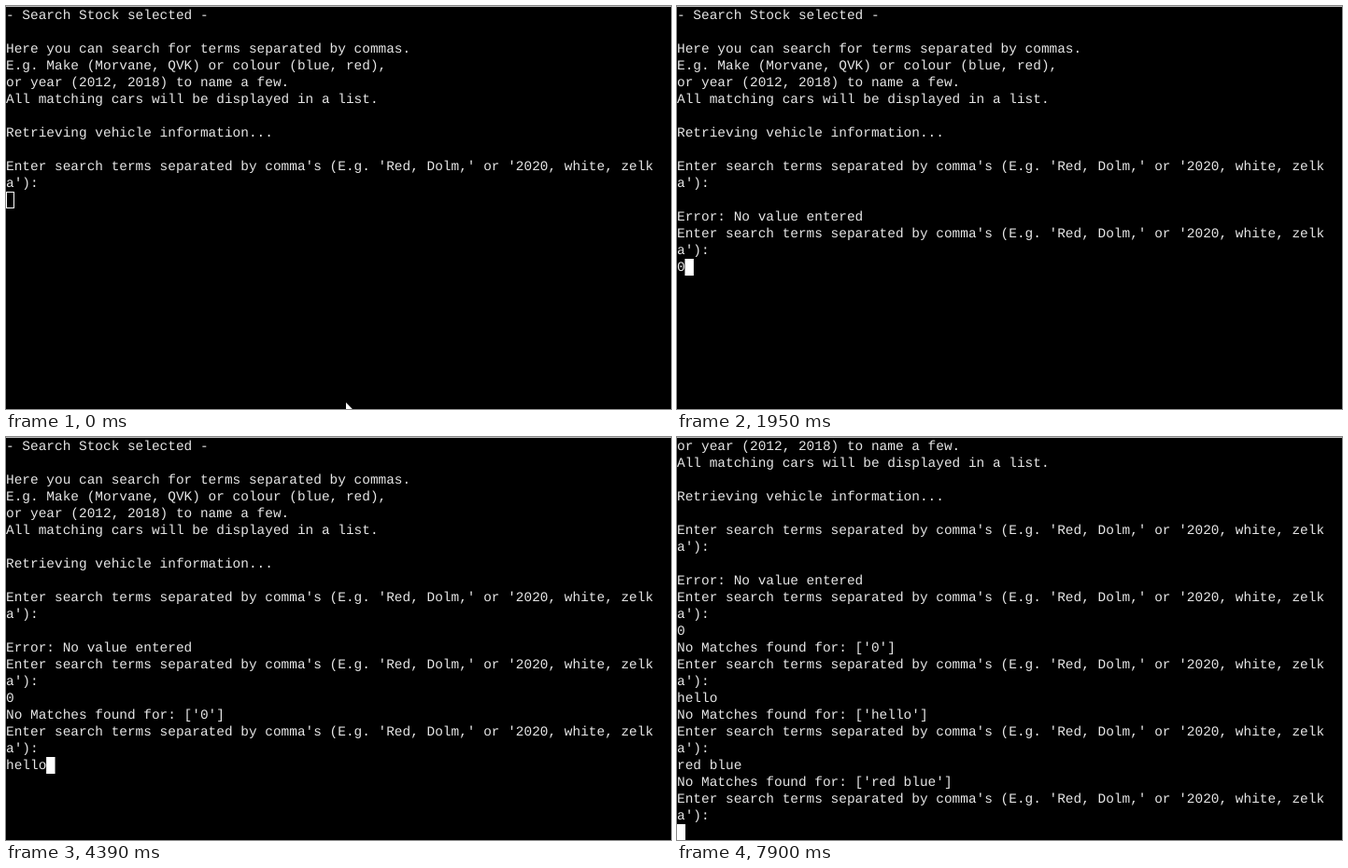
Animation, 712 px wide and 432 px high, one loop 7990 ms. Source, as an HTML page:

```html
<!DOCTYPE html>
<html lang="en">
<head>
<meta charset="utf-8">
<title>Search stock terminal</title>
<style>
html, body { margin: 0; width: 712px; height: 432px; overflow: hidden; background: #000; }
body { position: relative; border-top: 1px solid #bbb; box-sizing: border-box; }
pre, #caret, #pointer { position: absolute; left: 0; top: 0; margin: 0; }
pre {
  top: 1px;
  font: 14.44px/18px "Liberation Mono", monospace;
  text-rendering: geometricPrecision;
  color: #e6e6e6;
}
#caret { width: 8.67px; height: 18px; box-sizing: border-box; border: 1px solid #fff; }
#pointer { fill: #fff; }
</style>
</head>
<body>
<pre id="screen"></pre>
<div id="caret"></div>
<svg id="pointer" width="13" height="20"><path d="M0 0V15.5L3.7 12.2L6.2 17.8L8.6 16.7L6.2 11.2H11Z"/></svg>
<script>
const LOOP = 7990, ROWS = 24, COLS = 80, ROW_H = 18, COL_W = 8.666;
const FOCUS = 1000, POINTER_GONE = 1860;
const prompt = "Enter search terms separated by comma's (E.g. 'Red, Dolm,' or '2020, white, zelka'):\n";
const noMatch = term => `No Matches found for: ['${term}']\n` + prompt;
const intro = `- Search Stock selected -

Here you can search for terms separated by commas.
E.g. Make (Morvane, QVK) or colour (blue, red),
or year (2012, 2018) to name a few.
All matching cars will be displayed in a list.

Retrieving vehicle information...

` + prompt;

// [time, text appended to the terminal]
const output = [
  [0, intro],
  [1280, "\n"], [1390, "Error: No value entered\n" + prompt],
  [1860, "0"], [2350, "\n"], [2450, noMatch("0")],
  [3610, "h"], [3910, "e"], [4050, "l"], [4190, "l"], [4390, "o"],
  [4570, "\n"], [4680, noMatch("hello")],
  [5950, "r"], [6140, "e"], [6430, "d"], [6720, " "], [6900, "b"], [7090, "l"],
  [7350, "u"], [7390, "e"],
  [7530, "\n"], [7640, noMatch("red blue")]
];

const el = id => document.getElementById(id);
const screenEl = el("screen"), caret = el("caret"), pointer = el("pointer");
const wrap = line => line.match(new RegExp(`.{1,${COLS}}`, "g")) || [""];

function drawText(t) {
  const text = output.filter(([at]) => at <= t).map(([, s]) => s).join("");
  const lines = text.split("\n").flatMap(wrap).slice(-ROWS);
  const shown = lines.join("\n");
  if (screenEl.textContent !== shown) screenEl.textContent = shown;
  const x = lines[lines.length - 1].length * COL_W, y = (lines.length - 1) * ROW_H;
  caret.style.transform = `translate(${x}px, ${y}px)`;
  caret.style.background = t < FOCUS ? "none" : "#fff";
}

function drawPointer(t) {
  const p = Math.min(1, Math.max(0, (t - 110) / 760));
  const e = p * p * (3 - 2 * p);
  pointer.style.transform = `translate(${364 - 74 * e}px, ${424 - 148 * e}px)`;
  pointer.style.visibility = t < POINTER_GONE ? "visible" : "hidden";
}

const start = performance.now();
function frame() {
  const t = (performance.now() - start) % LOOP;
  drawText(t);
  drawPointer(t);
  requestAnimationFrame(frame);
}
frame();
</script>
</body>
</html>
```
